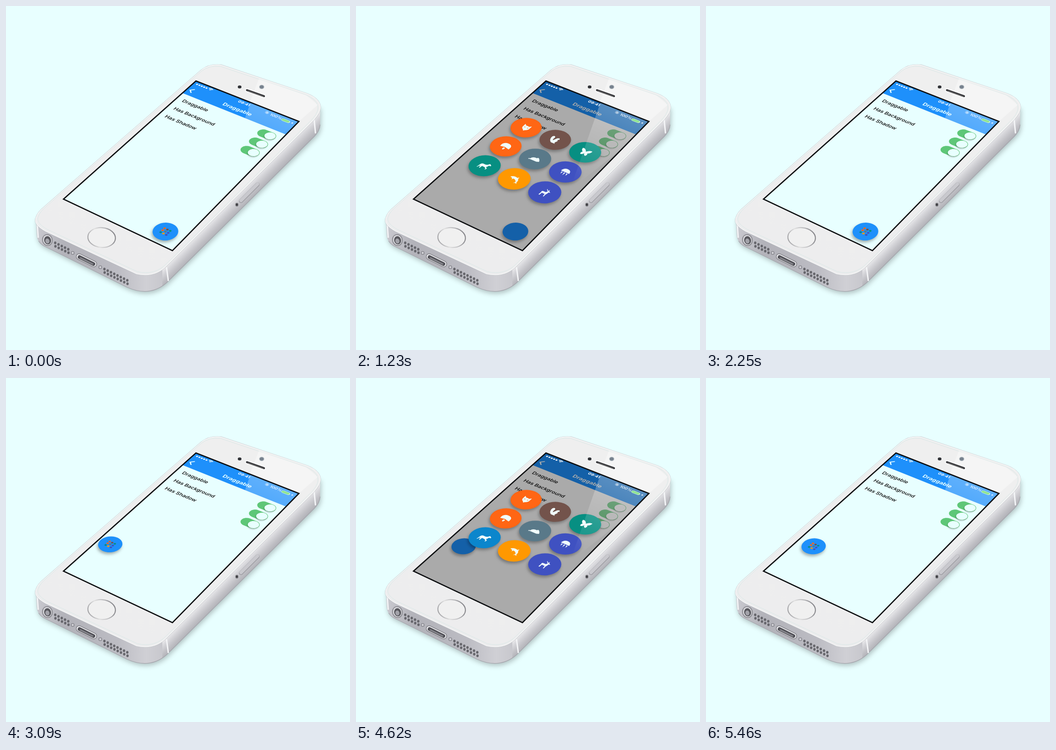
Animation, 748 px wide and 748 px high, one loop 5880 ms. Source, as an HTML page with a canvas:

```html
<!DOCTYPE html>
<html lang="en">
<head>
<meta charset="utf-8">
<title>Draggable menu</title>
<style>
html, body { margin: 0; width: 100%; height: 100%; overflow: hidden; background: #e8ffff; }
canvas { display: block; }
</style>
</head>
<body>
<canvas id="stage" width="748" height="748"></canvas>
<script>
const ctx = document.getElementById('stage').getContext('2d');
const LOOP = 5880, DUR = 430, STEP = 50, TAU = Math.PI * 2;
const FADE_IN = 680, FADE_OUT = DUR + 8 * STEP;
const FONT = 'Inter, Roboto, sans-serif';
const CYAN = '#e8ffff';

// Perspective of the 320 x 568 screen
const [a, b, c, d, e, f, g, h] = [196.3, -301.2, 413, 77.1, 212.8, 163, -0.04345, -0.10527];
function project(u, v) {
  const U = u / 320, V = v / 568, w = 1 + g * U + h * V;
  return [(a * U + b * V + c) / w, (d * U + e * V + f) / w, w];
}
function at(u, v, draw) {
  const [x, y, w] = project(u, v);
  ctx.save();
  ctx.transform((a - g * x) / w / 320, (d - g * y) / w / 320,
                (b - h * x) / w / 568, (e - h * y) / w / 568, x, y);
  draw();
  ctx.restore();
}

const clamp = x => Math.max(0, Math.min(1, x));
const mix = (p, q, k) => p + (q - p) * k;
const smooth = k => k * k * (3 - 2 * k);
const inBack = p => 2.70158 * p ** 3 - 1.70158 * p ** 2;
const outBack = p => 1 - inBack(1 - p);

function fill(path, color) { ctx.fillStyle = color; ctx.fill(path); }
function stroke(path, color, width) { ctx.strokeStyle = color; ctx.lineWidth = width; ctx.stroke(path); }
function dot(x, y, rx, color, ry = rx, rot = 0) {
  ctx.beginPath();
  ctx.ellipse(x, y, rx, ry, rot, 0, TAU);
  ctx.fillStyle = color;
  ctx.fill();
}
function pill(x, y, w, ht, color) {
  ctx.beginPath();
  ctx.roundRect(x - w / 2, y - ht / 2, w, ht, Math.min(w, ht) / 2);
  ctx.fillStyle = color;
  ctx.fill();
}
function poly(points) {
  const p = new Path2D();
  points.forEach(([x, y]) => p.lineTo(x, y));
  p.closePath();
  return p;
}
const band = (v0, v1) => poly([project(0, v0), project(320, v0), project(320, v1), project(0, v1)]);
function linear(x0, y0, x1, y1, ...colors) {
  const gr = ctx.createLinearGradient(x0, y0, x1, y1);
  colors.forEach((col, i) => gr.addColorStop(i / (colors.length - 1), col));
  return gr;
}
function shadow(alpha, blur, x, y) {
  ctx.shadowColor = `rgba(0,0,0,${alpha})`;
  ctx.shadowBlur = blur;
  ctx.shadowOffsetX = x;
  ctx.shadowOffsetY = y;
}
function text(str, u, v, size, weight, color, align = 'left') {
  at(u, v, () => {
    ctx.font = `${weight} ${size}px ${FONT}`;
    ctx.textAlign = align;
    ctx.textBaseline = 'middle';
    ctx.fillStyle = color;
    ctx.fillText(str, 0, 0);
  });
}

const screen = band(0, 568), header = band(0, 64);
const body = new Path2D('M65 462L67 499Q68 514 85 523L262 611Q312 634 349 602L670 284Q684 271 683 254L683 217L400 300Z');
const longSide = poly([[340, 565], [690, 215], [690, 290], [340, 625]]);
const face = new Path2D('M83 438L425 140Q442 126 468 129L654 191Q684 203 683 222Q682 233 668 248L349 564Q323 591 284 582L86 489Q59 474 66 460Q69 449 83 438Z');

function holes(x, y, cols) {
  for (let i = 0; i < cols; i++)
    for (let j = 0; j < 2; j++)
      dot(x + i * 7.1 + j * .5, y + i * 3.5 + j * 7.5, 2.6, '#66666c', 2.9);
}

function drawPhone() {
  ctx.save();
  shadow(.24, 11, 2, 5);
  fill(body, linear(65, 0, 365, 0, '#c9c9cf', '#b3b3ba', '#b6b6bd', '#bdbdc4', '#d0d0d5', '#c2c2c8'));
  ctx.restore();
  ctx.save();
  ctx.clip(body);
  fill(longSide, linear(498, 413, 519, 434, '#eeeef0', '#d6d6da', '#c2c2c7', '#b2b2b8'));
  ctx.restore();
  stroke(new Path2D('M71 511Q76 519 85 523L262 611Q312 634 349 602L670 284Q682 272 683 258'), '#a4a4ab', 1.3);
  stroke(new Path2D('M670 246L673 277M349 568L353 598M68 474L70 504'), '#f4f5f7', 3);

  // Card tray on the long side
  ctx.lineCap = 'round';
  stroke(new Path2D('M511 424L547 388'), '#a0a0a6', 9);
  stroke(new Path2D('M511 423L547 387'), '#c9c9ce', 7);
  dot(502, 432, 3.4, '#77777c', 4);
  dot(502, 432, 1.8, '#333337', 2.3);

  stroke(face, '#bfc1c5', 3.4);
  stroke(face, '#fbfdfd', 2.2);
  fill(face, linear(460, 130, 250, 580, '#efefef', '#ededee'));
  ctx.save();
  ctx.translate(374, 356);
  ctx.scale(.985, .985);
  ctx.translate(-374, -357);
  stroke(face, '#d9e7e6', 1);
  ctx.restore();
  fill(poly([[550, 158], [653, 194], [678, 215], [637, 251], [531, 207]]), 'rgba(255,255,255,.35)');

  // Bottom edge sockets
  dot(90, 509, 11.5, '#8c8c92', 13, -.25);
  dot(90, 509, 9.5, '#dcdce0', 11, -.25);
  dot(90.5, 509.5, 7.5, '#58585e', 9, -.25);
  dot(90, 511, 4.5, '#a3a3aa', 5.5, -.25);
  holes(107, 515, 5);
  holes(214, 572, 8);
  for (const [x, y] of [[145, 537], [205, 568]]) {
    dot(x, y, 4, '#8a8a91');
    dot(x, y, 2.4, '#d0d0d5');
  }
  stroke(new Path2D('M159 545L191 561'), '#828288', 14);
  stroke(new Path2D('M159 545L191 561'), '#e8e8eb', 11);
  stroke(new Path2D('M160 546L190 561'), '#515157', 8);
  stroke(new Path2D('M162 548L188 561'), '#85858b', 3.5);

  // Home button, earpiece, camera
  ctx.beginPath();
  ctx.ellipse(208, 503.5, 30, 21.5, .08, 0, TAU);
  ctx.fillStyle = '#f0f0f0';
  ctx.fill();
  ctx.strokeStyle = linear(178, 510, 238, 492, '#a0a0a3', '#e0e0e0', '#b5b5b8', '#7b7b7f');
  ctx.lineWidth = 2.2;
  ctx.stroke();
  stroke(new Path2D('M524 183L561 196'), '#fdfdfd', 8);
  stroke(new Path2D('M524 183L561 196'), '#3a3a3d', 4.5);
  stroke(new Path2D('M526 185L559 197'), '#777', 1.5);
  dot(508, 176, 4, '#303236', 3.2);
  dot(556, 176, 5.8, '#c9ced3', 4.8);
  dot(556, 176, 4.6, '#78838f', 3.8);
  ctx.lineCap = 'butt';
}

function drawStatus() {
  for (let i = 0; i < 5; i++) at(11 + i * 7.6, 11, () => dot(0, 0, 2.8, '#fff'));
  at(54, 14, () => {
    for (const r of [2, 5.5, 9]) {
      ctx.beginPath();
      ctx.arc(0, 1, r, -2.35, -.79);
      ctx.strokeStyle = '#fff';
      ctx.lineWidth = 2;
      ctx.stroke();
    }
  });
  text('09:41', 161, 13, 13, 700, '#fff', 'center');
  text('100%', 260, 15, 13, 500, '#fff', 'center');
  at(232, 13, () => {
    ctx.beginPath();
    ctx.arc(0, 0, 4.5, 0, TAU);
    ctx.strokeStyle = '#fff';
    ctx.lineWidth = 1;
    ctx.stroke();
    pill(0, 0, 4, 4, '#fff');
  });
  at(290, 16, () => {
    pill(0, 0, 25, 10, '#d8f7da');
    pill(-.5, 0, 22, 8, '#63da68');
  });
  at(309, 15, () => fill(new Path2D('M1 -5L-3 1L0 1L-1 5L3 -1L0 -1Z'), '#fff'));
}

function drawSettings(white, menu) {
  fill(screen, white);
  fill(header, '#1e90fb');
  at(14, 42, () => stroke(new Path2D('M5 -9L-4 0L5 9'), white, 3.4));
  text('Draggable', 160, 44, 17.5, 700, white, 'center');
  ['Draggable', 'Has Background', 'Has Shadow'].forEach((label, i) => {
    const v = 91 + i * 39.5;
    text(label, 19, v, 16.4, 500, '#050505');
    at(279, v, () => {
      pill(0, 0, 51, 31, '#5ec778');
      ctx.save();
      shadow(.25, 3, -1, 2);
      dot(10, 0, 14.3, white);
      ctx.restore();
    });
  });
  at(...menu, () => {
    ctx.save();
    shadow(.32, 6, -2, 4);
    dot(0, 0, 30, '#1e90fb');
    ctx.restore();
  });
}

// Colour and silhouette of each button, row by row
const ORANGE = '#ff6614', INDIGO = '#3f51c1', TEAL = '#078f82';
const buttons = [
  [ORANGE, 'M-10 -12L-4 -7Q0 -9 4 -7L10 -12L10 2Q8 8 3 10L0 14L-3 10Q-8 8 -10 2ZM-6 -3L-2 0L-5 1ZM6 -3L2 0L5 1Z'],
  ['#73534b', 'M-4 14L8 14Q3 12 6 6Q9 0 5 -3L9 -6L6 -11L1 -8Q-2 -2 -4 4Q-7 2 -6 -4Q-5 -10 -9 -12Q-15 -11 -14 -3Q-13 8 -4 14Z'],
  [TEAL, 'M0 -3Q6 -14 14 -12Q14 -3 7 1Q11 6 7 12Q2 11 0 4Q-2 11 -7 12Q-11 6 -7 1Q-14 -3 -14 -12Q-6 -14 0 -3Z'],
  [ORANGE, 'M0 3L-13 6Q-16 -12 0 -13Q16 -12 13 6ZM-3 8Q0 3 3 8L1 14L-2 14Z'],
  ['#597989', 'M-15 9Q-17 4 -12 5Q-10 -6 2 -5Q4 -10 8 -6Q14 0 14 4L8 7L-10 7L-12 7Z'],
  [INDIGO, 'M-12 1Q-11 -12 0 -12Q11 -12 12 1ZM-9 3L-5 3L-7 12ZM-2 3L2 3L0 14ZM5 3L9 3L8 12Z'],
  [TEAL, 'M-13 2Q-13 -4 -8 -5Q0 -4 4 -7L8 -13L14 -9L13 -6L9 -6Q9 0 6 2L11 6L9 11L7 10L8 7L2 4L-5 4L-6 13L-8 13L-9 5L-12 9L-14 14L-15 12L-12 3L-15 8Z'],
  ['#ff9800', 'M-13 -2Q-6 -11 4 -7L8 -11L8 -5Q13 0 12 8L15 13L10 11L6 14L9 8Q6 1 -2 0L-5 5L-6 0Z'],
  [INDIGO, 'M-9 14L-8 4Q-10 0 -7 -2L2 -2L4 -7L0 -10L-2 -14L2 -11L4 -9L6 -14L7 -9L12 -6L8 -4Q8 3 6 5L6 14L4 14L3 5L-5 5L-6 14Z']
].map(([color, icon]) => ({ color, icon: new Path2D(icon) }));

// Start of opening and closing, and the launch rank of each button
const runs = [
  { open: 342, close: 1420, rank: [6, 2, 5, 7, 0, 4, 1, 8, 3] },
  { open: 3568, close: 4630, rank: [6, 5, 3, 7, 4, 0, 1, 8, 2] }
];
const HORSE = 6;

function drawButtons(t, run, menu) {
  buttons.forEach(({ color, icon }, i) => {
    const col = i % 3 - 1, row = Math.floor(i / 3) - 1;
    const closing = t >= run.close;
    const p = clamp((t - (closing ? run.close : run.open) - run.rank[i] * STEP) / DUR);
    const k = closing ? 1 - inBack(p) : outBack(p);
    const u = mix(menu[0] + col * 8, 160 + col * 90, k);
    const v = mix(menu[1] + row * 8, 284 + row * 90, k * Math.abs(k));
    const pressed = i === HORSE && run === runs[1] && t > 4560 && t < 5460;
    at(u, v, () => {
      ctx.save();
      if (k > .02) shadow(.3, 6, -2, 4);
      dot(0, 0, Math.max(1.5, 3 + 37 * k), pressed ? '#0b86cc' : color);
      ctx.restore();
      if (k <= 0) return;
      if (!closing) ctx.rotate((k - 1) * TAU);
      ctx.scale(k, k);
      ctx.globalAlpha = clamp((closing ? 1 - p : p) * 2.2);
      ctx.fillStyle = '#f0fcfc';
      ctx.fill(icon, 'evenodd');
    });
  });
}

function menuAt(t) {
  const drag = smooth(clamp((t - 2490) / 460)), snap = smooth(clamp((t - 2950) / 230));
  return [mix(mix(270, 12, drag), 46, snap), mix(mix(525, 425, drag), 428.5, snap)];
}

const glare = poly([[549, 160], [700, 220], [640, 262], [465, 400]]);

function draw(t) {
  const run = runs[t < 2400 ? 0 : 1], menu = menuAt(t);
  const dim = .333 * (clamp((t - run.open) / FADE_IN) - clamp((t - run.close) / FADE_OUT));
  ctx.fillStyle = CYAN;
  ctx.fillRect(0, 0, 748, 748);
  drawPhone();
  ctx.save();
  ctx.clip(screen);
  drawSettings(dim > 0 ? '#fff' : CYAN, menu);
  fill(screen, `rgba(0,0,0,${dim})`);
  drawStatus();
  drawButtons(t, run, menu);
  if (!dim) ctx.clip(header);
  fill(glare, linear(560, 200, 475, 390, 'rgba(255,255,255,.32)', 'rgba(255,255,255,0)'));
  ctx.restore();
  stroke(screen, '#0b0d0f', 2.6);
}

function tick() {
  draw(performance.now() % LOOP);
  requestAnimationFrame(tick);
}
tick();
</script>
</body>
</html>
```
